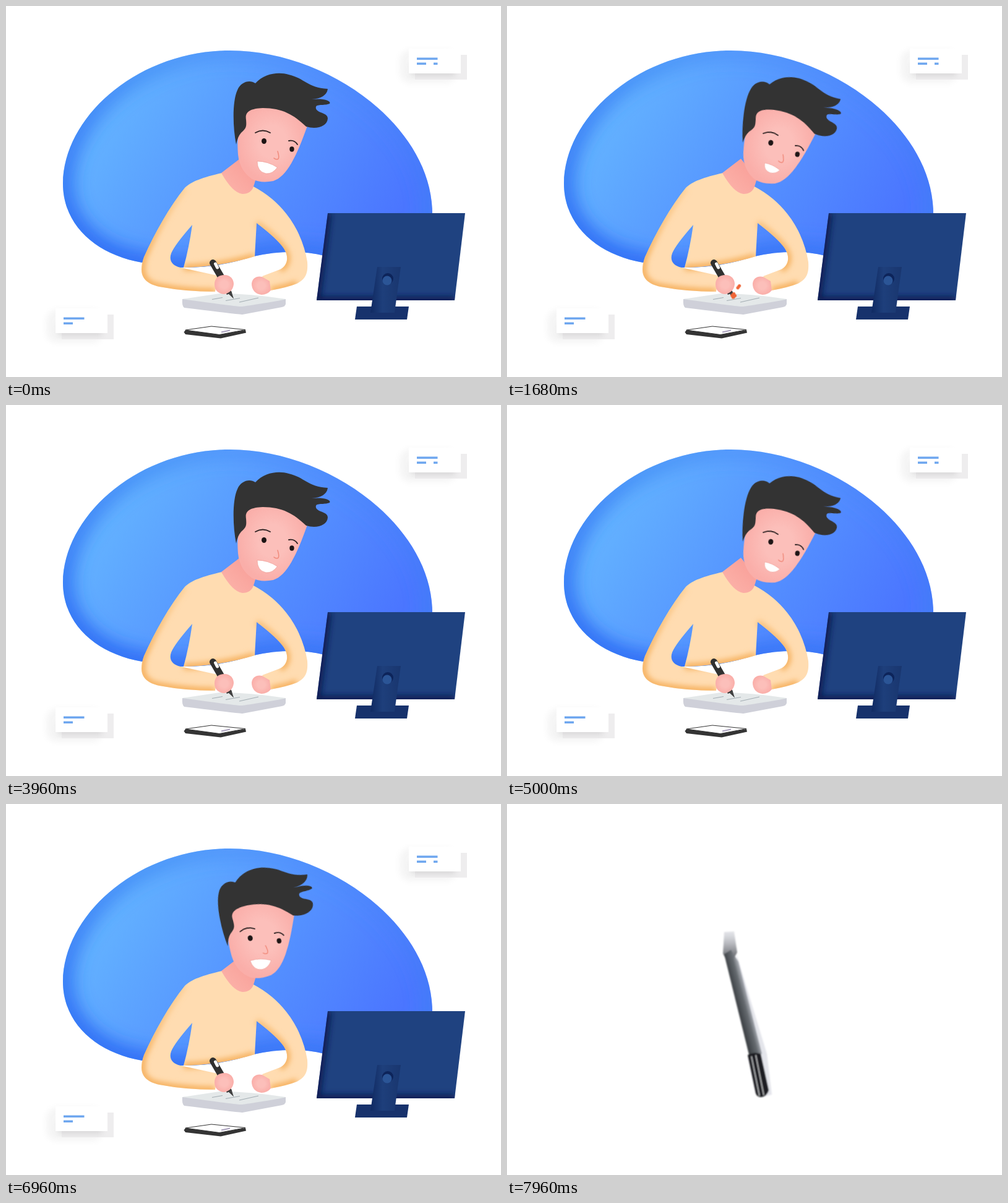
An HTML page that plays this animation: 800 by 600 pixels, repeating every 8000 ms.

```html
<!DOCTYPE html>
<html lang="en">
<head>
<meta charset="utf-8">
<title>Writing at the desk</title>
<style>
html, body { margin: 0; width: 100%; height: 100%; overflow: hidden; background: #fff; }
svg { display: block; width: 100vw; height: 100vh; }

.scene { animation: leave 8s step-end infinite; }
.closeup { opacity: 0; animation: enter 8s step-end infinite; }
@keyframes leave { 0% { opacity: 1 } 99.35%, 100% { opacity: 0 } }
@keyframes enter { 0% { opacity: 0 } 99.35%, 100% { opacity: 1 } }

.head, .features, .mouth { animation: 4s ease-in-out infinite; }
.head { transform-origin: 372px 224px; animation-name: nod; }
.features { animation-name: look; }
.mouth { transform-origin: 422px 260px; animation-name: smile; }
@keyframes nod {
  0%, 7%, 98%, 100% { transform: translate(0px, 0px) rotate(0deg) }
  25%, 49% { transform: translate(9px, -3px) rotate(7.3deg) }
  70%, 86% { transform: translate(-13.5px, 6px) rotate(-10.8deg) }
}
@keyframes look {
  0%, 7%, 25%, 49%, 98%, 100% { transform: translate(0px, 0px) }
  70%, 86% { transform: translate(-7px, -.5px) }
}
@keyframes smile {
  0%, 7%, 98%, 100% { transform: translate(0px, 0px) rotate(0deg) scale(1, 1) }
  25%, 49% { transform: translate(2px, -1px) rotate(3deg) scale(.8, .7) }
  70%, 86% { transform: translate(-2px, .5px) rotate(-7deg) scale(1, .97) }
}
</style>
</head>
<body>
<svg viewBox="0 0 800 600" preserveAspectRatio="none">
  <defs>
    <path id="blob" d="M220 415C146 402 92 355 92 287C93 178 214 72 362 72C520 72 689 195 689 336L689 370L515 404Q462 391 400 405C360 417 330 424 272 423Z"/>
    <path id="body" d="M349 270C318 277 299 284 289 294C264 325 241 366 223 406Q219 417 219 426C219 442 230 450 248 454Q290 462 338 462L342 436L282 423C268 420 263 411 267 400Q272 387 301 354Q296 390 287 423Q345 422 402 405L405 351Q438 376 449 392C458 406 455 420 443 426L414 437L428 460Q455 455 470 449C486 441 488 430 487 414C483 388 472 360 453 336Q432 309 400 292Z"/>
    <path id="screen" d="M520 335H742L725 476H502Z"/>
    <path id="face" d="M384 166L385 185Q385 197 377 204Q373 212 375 240C377 260 386 272 398 280Q412 287 432 283C454 276 470 242 487 194L460 168L415 155Z"/>
    <clipPath id="inBlob"><use href="#blob"/></clipPath>
    <clipPath id="inBody"><use href="#body"/></clipPath>
    <clipPath id="inScreen"><use href="#screen"/></clipPath>
    <linearGradient id="sky" gradientUnits="userSpaceOnUse" x1="190" y1="160" x2="580" y2="415">
      <stop stop-color="#62b0ff"/><stop offset=".5" stop-color="#5593ff"/><stop offset="1" stop-color="#4b76ff"/>
    </linearGradient>
    <linearGradient id="rim" gradientUnits="userSpaceOnUse" x1="220" y1="420" x2="420" y2="60">
      <stop stop-color="#2462f3"/><stop offset=".7" stop-color="#3a82f2" stop-opacity=".7"/><stop offset="1" stop-color="#4180f5" stop-opacity=".35"/>
    </linearGradient>
    <linearGradient id="fold" x1="0" y1="280" x2="0" y2="410" gradientUnits="userSpaceOnUse">
      <stop stop-color="#f6b460" stop-opacity=".25"/><stop offset="1" stop-color="#f4a94f"/>
    </linearGradient>
    <linearGradient id="throat" x1="0" y1="1" x2="1" y2="0">
      <stop stop-color="#fcb5ac"/><stop offset="1" stop-color="#f89b95"/>
    </linearGradient>
    <radialGradient id="skin"><stop offset=".4" stop-color="#fcbfba"/><stop offset="1" stop-color="#faaea9"/></radialGradient>
    <linearGradient id="post" x1="0" y1="0" x2="1" y2="0">
      <stop stop-color="#102a62"/><stop offset=".4" stop-color="#1e3f7b"/><stop offset="1" stop-color="#19366f"/>
    </linearGradient>
    <linearGradient id="shaft" gradientUnits="userSpaceOnUse" x1="370" y1="330" x2="400" y2="322">
      <stop stop-color="#34383c"/><stop offset=".5" stop-color="#666b70"/><stop offset="1" stop-color="#c4c8d2" stop-opacity=".5"/>
    </linearGradient>
    <linearGradient id="nib" x1="0" y1="0" x2="0" y2="1">
      <stop stop-color="#b5b8c4" stop-opacity=".35"/><stop offset="1" stop-color="#24272a"/>
    </linearGradient>
    <filter id="soft" x="-30%" y="-30%" width="160%" height="160%"><feGaussianBlur stdDeviation="5"/></filter>
    <filter id="softer"><feGaussianBlur stdDeviation="15"/></filter>
    <filter id="smear" x="-60%" y="-20%" width="220%" height="140%"><feGaussianBlur stdDeviation="1.3 1"/></filter>
    <g id="card">
      <rect x="-15" y="2" width="92" height="54" rx="18" fill="#888" opacity=".08" filter="url(#soft)"/>
      <rect x="10" y="10" width="84" height="40" fill="#eeedee"/>
      <rect x="3" y="24" width="72" height="20" fill="#777" opacity=".18" filter="url(#soft)"/>
      <rect width="84" height="40" fill="#fff"/>
      <path d="M13 16.3H46.5M13 24.3H28" stroke="#6fa7ef" stroke-width="3.5"/>
    </g>
  </defs>

  <g class="scene">
    <use href="#card" x="80" y="489"/>
    <use href="#card" x="651" y="69"/>
    <path d="M691 93.3H697.5" stroke="#6fa7ef" stroke-width="3.5"/>

    <use href="#blob" fill="url(#sky)"/>
    <g clip-path="url(#inBlob)">
      <use href="#blob" fill="none" stroke="url(#rim)" stroke-width="28" filter="url(#softer)"/>
    </g>

    <use href="#screen" fill="#1f4280"/>
    <g clip-path="url(#inScreen)">
      <path d="M520 335L502 476H725" fill="none" stroke="#081b52" stroke-width="12" filter="url(#soft)"/>
    </g>
    <path d="M567 486H651L648 507H564Z" fill="#17326c"/>
    <path d="M600 422H638L628 496H589Z" fill="url(#post)"/>
    <circle cx="617" cy="441" r="9" fill="#0d245a"/>
    <circle cx="616" cy="444" r="7.5" fill="#2b5596"/>

    <use href="#body" fill="#ffdcb1"/>
    <g clip-path="url(#inBody)">
      <path d="M289 294C264 325 241 366 223 406C214 436 225 450 248 454Q290 462 338 462M287 423Q345 422 402 405M405 351Q438 376 449 392C458 406 455 420 443 426M428 460Q455 455 470 449" fill="none" stroke="url(#fold)" stroke-width="9" filter="url(#soft)"/>
    </g>
    <path d="M348 270L378 247L404 279L400 292Q396 304 382 304Q366 302 348 270Z" fill="url(#throat)"/>

    <g class="head">
      <use href="#face" fill="url(#skin)"/>
      <path fill="#333" d="M372 224C366 194 366 153 374 136C380 122 394 119 403 125C418 109 440 106 457 111C483 117 487 132 520 134Q518 149 494 151C513 149 526 153 523 158C513 162 499 157 501 166C504 174 520 172 520 182C519 195 502 200 485 195C465 176 447 165 415 165C394 166 386 171 388 184C389 196 388 198 380 205Q374 212 372 224Z"/>
      <g class="features">
        <path d="M403 205Q415 198 427 205M457 218Q466 216 471 224" fill="none" stroke="#2d2222" stroke-width="1.8" stroke-linecap="round"/>
        <ellipse cx="417" cy="218.5" rx="4" ry="4.5" fill="#1d1515"/>
        <ellipse cx="462" cy="231.5" rx="3.7" ry="4.2" fill="#1d1515"/>
        <path d="M439 235Q443 248 438 248Q435 248 433 246" fill="none" stroke="#f18b7c" stroke-width="1.5" stroke-linecap="round"/>
      </g>
      <path class="mouth" d="M406 251Q423 251 438.500 261Q431 272 420 271Q406 268 406 251Z" fill="#fff" stroke="#e98f86" stroke-width=".6"/>
    </g>

    <path d="M285 474L343 471L452 474V482Q451 486 446 487L382 499Q378 499 288 488Q284 485 285 474Z" fill="#cfd0d9"/>
    <path d="M285 474L345 465Q395 465 452 474Q448 476 382 486Q378 487 285 474Z" fill="#e4e8e9"/>
    <path d="M333 474.500L350 471.500M355 476.500L378 472.500M377 479L408 472" stroke="#a3adb3" stroke-width="1.2"/>

    <path d="M334.500 415.500L347 437" stroke="#303030" stroke-width="11" stroke-linecap="round"/>
    <path d="M345 435L361 465" stroke="#333" stroke-width="9"/>
    <path d="M359 465L364.500 462L368 473.500Z" fill="#414141"/>
    <path d="M338.500 417L341.500 423" stroke="#fff" stroke-width="5" stroke-linecap="round"/>
    <path d="M337 450C337 440 344 435 353 435C363 435 368 442 368 450C367 459 361 465 352 466C342 465 337 459 337 450Z" fill="url(#skin)"/>
    <path d="M397 449C398 440 405 436 414 438L426 445L428 460Q422 467 413 467C403 466 397 459 397 449Z" fill="url(#skin)"/>

    <path d="M287.500 527.500L290 524L345 531L387 524L388 528.500L347 537.500L290 531Z" fill="#343434"/>
    <path d="M290 524L332 518L387 523.500L345 531.500Z" fill="#fff" stroke="#333" stroke-width="1" stroke-linejoin="round"/>
    <path d="M348 527.500L362 524.500" stroke="#aaa0bd" stroke-width="2"/>
    <g id="sparks" fill="#ef6537"></g>
  </g>

  <g class="closeup" filter="url(#smear)">
    <path d="M370 240L420 404L428 470L410 474Z" fill="#c9cbd8" opacity=".5"/>
    <path d="M351 207L367 206L372 240L360 262L349 242Z" fill="url(#nib)"/>
    <path d="M351 243L362 236L374 255L412 404L391 405Z" fill="url(#shaft)"/>
    <path d="M389 406Q399 400 410 404L423 463Q420 473 411 474Q404 474 402 468Z" fill="#1d1f21"/>
    <path d="M395 408L408 472M402 406L415 471" stroke="#d5d7da" stroke-width="1.3"/>
  </g>
</svg>
<script>
const GRAVITY = 740, FALL = 98, LOOP = 4;
const layer = document.getElementById('sparks');

function add(parent, tag, attrs = {}) {
  const el = document.createElementNS('http://www.w3.org/2000/svg', tag);
  for (const key in attrs) el.setAttribute(key, attrs[key]);
  return parent.appendChild(el);
}

for (let i = 0; i < 10; i++) {
  const vx = 90 * Math.cos(i * 2.1);
  const vy = -40 - 185 * Math.abs(Math.cos(i * 1.3));
  const life = (-vy + Math.sqrt(vy * vy + 2 * GRAVITY * FALL)) / GRAVITY;
  const offset = life / LOOP;
  // A parabola is exactly a cubic Bezier with evenly spaced time handles.
  const lift = vy * life / FALL / 3 * 2 / 2;
  const arc = `cubic-bezier(.33333, ${lift}, .66667, ${lift + 1 / 3})`;
  const timing = { duration: LOOP * 1000, delay: 1600 + i * 40, iterations: Infinity };

  const drift = add(layer, 'g', { opacity: 0 });
  const rise = add(drift, 'g');
  add(rise, 'rect', {
    x: -4.5, y: -2.5, width: 9, height: 5, rx: 2,
    transform: `translate(367 470) rotate(${-52 + i * 7})`
  });

  const endX = `translateX(${vx * life}px)`;
  drift.animate([
    { transform: 'translateX(0px)', opacity: 1 },
    { transform: endX, opacity: 1, offset },
    { transform: endX, opacity: 0, offset },
    { transform: endX, opacity: 0 }
  ], timing);
  rise.animate([
    { transform: 'translateY(0px)', easing: arc },
    { transform: `translateY(${FALL}px)`, offset },
    { transform: `translateY(${FALL}px)` }
  ], timing);
}
</script>
</body>
</html>
```
